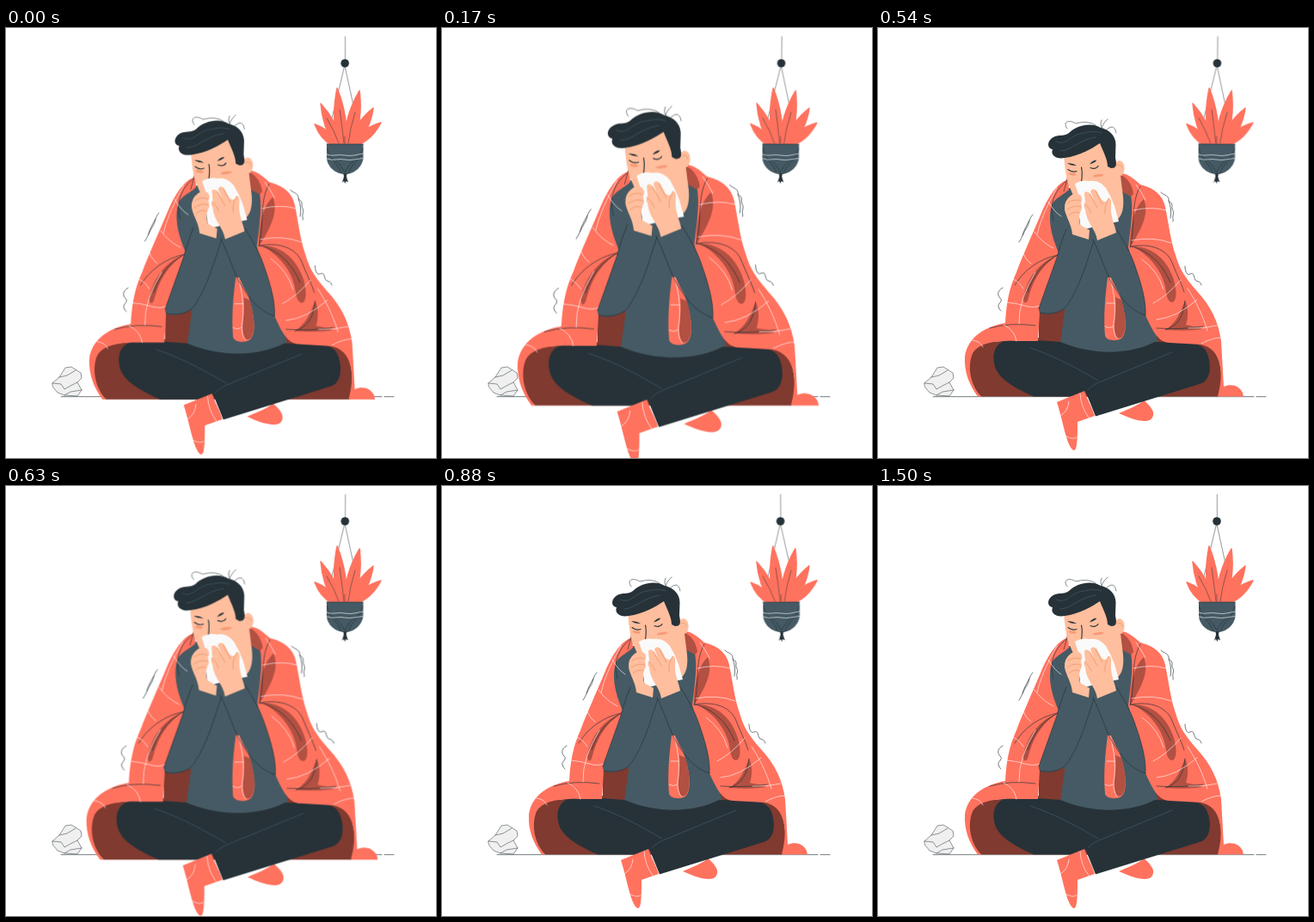
Recreate the animation shown at these times as an HTML page. Size 500 by 500 pixels, loop 1.54 s.

```html
<!DOCTYPE html>
<html lang="en">
<head>
<meta charset="utf-8">
<title>Shivering with a cold</title>
<style>
  html, body { margin: 0; width: 100%; height: 100%; overflow: hidden; background: #fff; }
  svg { display: block; width: 100vw; height: 100vh; }
  path { fill: none; stroke-linecap: round; stroke-linejoin: round; }
  .coral { fill: #ff725e; }
  .fold { fill: #b25042; }
  .deep { fill: #803a2f; }
  .dark { fill: #263238; }
  .cloth { fill: #455a64; }
  .skin { fill: #ffbe9d; }
  .blush { fill: #f79a78; }
  .paper { fill: #f0f0f0; stroke: #263238; stroke-width: .5; }
  .tissue { fill: #fafafa; }
  .ink { stroke: #263238; stroke-width: .65; }
  .soft { stroke: #455a64; stroke-width: .7; }
  .chalk { stroke: #fff; stroke-opacity: .75; stroke-width: .8; }
  .crease { stroke: #eb996e; stroke-width: .8; }
  #man { transform-origin: 263px 297px; }
  #plant { transform-origin: 397px 95px; }
</style>
</head>
<body>
<svg viewBox="0 0 500 500">
  <path class="ink" d="M64 428.700H437M440 428.700H451"/>
  <g id="crumple">
    <path class="paper" d="M54 413L62 406L69 395L76 394L87 401L88 407L83 412L88 421L83 428L68 427L60 424L55 418Z"/>
    <path class="ink" style="stroke-width:.5" d="M62 406L71 404L81 398M54 413L64 414L68 420L75 416L83 412M68 427L75 423L88 421"/>
  </g>

  <g id="plant">
    <path class="ink" style="stroke-width:.5" d="M394.300 10V37M393.600 44L379 105L374 136M393.900 44L414 136"/>
    <circle class="dark" cx="394" cy="41" r="4.800"/>
    <g id="leaves" class="coral"></g>
    <path class="ink" style="stroke-width:.5" d="M388 95Q391 115 393 134M406 98Q400 117 398 134M373 105Q382 120 387 134M394 126V134"/>
    <path class="cloth" d="M373 135H415.500V151C415 160 406 170 394.500 170C383 170 373.500 161 373 151Z"/>
    <path class="ink" d="M373 135H415.500M373.500 140C378 155 385 156 390 169M415 140C411 155 403 156 398 169M383 153Q389 158 394 168Q399 158 406 153"/>
    <path class="chalk" d="M373 147Q378 149 383 148T394 148T405 148T415 146M373.500 152Q379 154 384 153T394 153T405 153T415 151.500"/>
    <path class="dark" d="M392.500 169H396.500L396 173L398 179.500L395.500 178L394.500 181L393 178L391 180L393 173Z"/>
  </g>

  <g id="man">
    <path class="ink" d="M180 217C175 222 176 228 173 232C169 238 168 243 164 249M176 224Q170 234 168 241M145 302C138 306 139 311 142 314C146 318 139 320 140 324Q141 328 143 329"/>
    <path class="ink" d="M329 191C333 195 337 194 338 199C338 204 342 201 342 207C341 212 345 212 343 218C342 222 344 222 343 225M338 201Q342 211 340 221M357 277C357 283 359 288 363 286C368 284 367 290 369 293C372 296 374 293 376 299"/>

    <path class="deep" d="M120 428.500C103 414 98 378 122 366L187 360L187 325H222L300 320L320 355L380 362C399 376 403 405 396 428.500Z"/>
    <path class="cloth" d="M220 186C200 194 194 207 198 224L206 268L217 330L212 366C235 382 291 381 325 365L318 330L300 265L297 186Z"/>

    <path class="coral" d="M280 448C289 444 303 439 309 433C313 436 319 442 320 447C321 453 317 457 311 457C300 457 289 452 280 448Z"/>
    <path class="dark" d="M185 363H153C139 364 134 374 134.500 385C135 404 151 415 181 428.500H240L241 422L253 451.500L374 414C386 411 388 395 384 382C381 370 373 367 358 366L322 365C295 379 252 382 212 365Z"/>
    <path class="soft" d="M177 372C207 382 230 395 256 410M244 421Q250 414 262 410L342 377"/>
    <path class="coral" d="M208 435L240 422C243 432 249 441 252 451L232 458C232 471 232 483 230 489Q228 493 225 489C218 479 215 457 208 435Z"/>
    <path class="chalk" d="M235 425Q236 441 245 453M212 451Q221 446 222 434M219 475Q227 479 231 476"/>

    <path class="coral" d="M221 167L219 177C206 182 196 201 190 215C180 239 168 265 161 284C152 303 149 323 148 343C124 347 104 360 101 382C100 400 106 415 116 428.500H120C108 416 104 396 109 381C114 367 135 363 160 364H186L188 331L211 263C200 239 197 218 203 204C207 197 216 194 222 188Z"/>
    <path class="coral" d="M283 169C292 170 298 176 305 182C321 186 331 194 334 208C338 227 340 247 346 264C351 282 358 291 370 305C388 324 396 343 399 364L402 417C411 413 420 416 424 424L425 428.500H395C402 404 401 373 375 368L339 366C326 365 320 354 311 334L291 255C294 230 297 211 294 194Z"/>
    <path class="fold" d="M281 170C291 174 296 184 297 193L294 196L283 190Z"/>
    <path class="fold" d="M309 199C315 214 309 230 293 255C293 235 296 211 309 199Z"/>
    <path class="fold" d="M296 254C321 254 336 271 343 290C347 301 348 314 344 318C340 321 336 316 335 307C333 288 320 266 296 254Z"/>
    <path class="fold" d="M334 351C347 343 352 330 357 317C361 324 361 337 358 345C365 347 374 347 377 350C367 352 350 352 334 351Z"/>
    <path class="fold" d="M209 264C190 277 181 291 174 317Q170 323 169 315C172 292 188 272 209 264Z"/>
    <path class="ink" d="M209 264C188 268 169 282 159 299M209 264C191 273 181 288 174 307M294 254C316 259 331 275 340 296M294 254C317 250 336 257 342 273C349 290 354 300 356 307M357 317C355 336 349 346 334 351M324 349Q353 351 378 347M130 349Q154 342 183 346M222 169L216 190M219 178C204 190 199 206 204 224M305 184C293 205 300 230 293 255"/>
    <path class="chalk" d="M198 202Q205 214 213 219M182 237Q190 249 204 256M169 262Q172 270 178 274M157 292Q164 295 169 303M150 319Q161 320 171 323T188 323M146 345Q159 351 161 364M110 363Q119 364 122 371M208 186Q190 217 185 240M183 284Q163 316 164 344"/>
    <path class="chalk" d="M300 182Q306 190 311 200M297 212Q318 207 335 212M295 247Q320 242 341 250M307 269Q326 283 332 304M320 320Q337 311 352 293M324 339Q347 337 371 316M361 349Q378 350 394 346M376 367Q389 360 399 360M360 303C370 318 378 335 383 352"/>
    <path class="coral" d="M267 290C264 312 262 337 264 358C266 364 279 365 284 360C289 353 289 342 285 324L275 290Z"/>
    <path class="fold" d="M276 313C278 332 272 347 277 359Q280 362 284 359C290 350 288 335 283 316Z"/>
    <path class="chalk" d="M270 291C275 308 277 329 274 343Q273 355 278 361M266 320H275M264 347Q269 350 273 347"/>

    <path class="cloth" d="M219 234C213 249 210 259 208 267L187 326Q186 333 196 333C208 332 216 329 221 321C236 298 243 271 251 247Z"/>
    <path class="ink" d="M219 234C213 249 210 259 208 267L187 326M188 331C201 334 215 331 221 321C236 298 243 271 251 247"/>
    <path class="cloth" d="M250 246L278 235C287 251 294 261 300 280C307 300 312 319 311 334C296 329 284 316 276 301Z"/>
    <path class="ink" d="M250 246C261 268 266 290 276 303C286 320 298 330 311 334M278 235C287 251 294 261 300 280C307 300 312 319 311 334"/>

    <path class="skin" d="M216 147C217 161 219 176 222 183L231 204L263 209L277 224C285 218 286 207 285 196L282 172C289 169 288 154 280 154L274 158L262 130Z"/>
    <path class="crease" d="M278 160Q283 157 284 163"/>
    <ellipse class="blush" cx="226" cy="170" rx="4.500" ry="1.600" transform="rotate(8 226 170)"/>
    <ellipse class="blush" cx="256" cy="171.500" rx="6.500" ry="1.600" transform="rotate(-8 256 171)"/>
    <path class="ink" d="M221 164.500Q226 168.500 231 166.500M247 162.500Q253 165 256 160.500M236.500 162Q238 168 236.500 179" style="stroke-width:1.100"/>
    <path class="dark" d="M220 157.500Q226 156.500 231 160Q226 160.500 220 157.500ZM246 158.500Q249 154 254 153.500Q254 156 246 158.500Z"/>
    <path class="dark" d="M217 151C208 153 200 148 203 141C196 140 196 130 206 126C212 124 217 126 222 122C231 113 248 109 259 116C268 118 276 124 276.500 135L276 151C278 160 277 163 271 163L267 161C267 153 262 144 258 134C249 140 234 149 217 151Z"/>
    <path class="ink" style="stroke-width:.55" d="M220 117C214 109 222 106 230 111Q244 107 253 113M259 118Q262 110 267 106M262 118Q257 113 260 107M266 118Q275 110 277 122"/>
    <path class="soft" d="M207 132C220 138 224 123 240 122Q252 119 260 122M212 143C224 143 233 130 253 127"/>

    <path class="tissue" d="M229 181Q237 176 246 178Q257 176 265 186Q271 196 275 207L280 225L260 229L236 235L233 212L234 197Z"/>
    <path class="skin" d="M224 195Q230 190 235 194Q239 198 236 203L237 210Q232 219 235 229L246 235L245 246L226 240C225 228 219 221 217 211Q216 201 224 195Z"/>
    <path class="crease" d="M221 203Q228 198 235 201M220 211Q229 205 236 208M222 218Q228 212 234 215"/>
    <path class="skin" d="M240 192Q242 188 247 193L251 200L247 190Q249 185 254 189L260 200Q265 205 268 198Q272 197 271 207C270 220 276 230 277 238L255 247C253 233 242 226 241 211Q238 206 241 204Z"/>
    <path class="crease" d="M240 204Q246 209 248 215M246 193L255 209M253 190L261 205M268 198Q263 207 264 216"/>
  </g>
</svg>
<script>
  // Each leaf: base x, tip x, tip y, half width
  const leaves = [
    [384, 359, 112, 8], [387, 366, 88, 9], [404, 436, 110, 9],
    [402, 427, 93, 10], [398, 411, 73, 11], [391, 385, 70, 10]
  ];
  const soil = 136;

  function leafPath([bx, x, y, w]) {
    const dx = x - bx, dy = y - soil, len = Math.hypot(dx, dy);
    const nx = -dy / len * w, ny = dx / len * w;
    const mx = bx + dx * .5, my = soil + dy * .5;
    const side = s => `${mx + s * nx} ${my + s * ny}`;
    return `M${bx - 5} ${soil}Q${side(-1)} ${x} ${y}Q${side(1)} ${bx + 5} ${soil}Z`;
  }

  const NS = 'http://www.w3.org/2000/svg';
  for (const leaf of leaves) {
    const p = document.createElementNS(NS, 'path');
    p.setAttribute('d', leafPath(leaf));
    p.setAttribute('class', 'coral');
    // Slightly rounded tips
    p.setAttribute('style', 'stroke:#ff725e;stroke-width:1.5');
    document.getElementById('leaves').append(p);
  }

  const LOOP = 1540, LEAD = 37;

  function play(id, steps) {
    const frames = steps.map(([ms, transform]) => ({ offset: ms / LOOP, transform }));
    document.getElementById(id).animate(frames, { duration: LOOP, delay: -LEAD, iterations: Infinity });
  }

  const rest = 'scale(1)', beat = 'scale(1.1)';
  play('man', [[0, rest], [150, beat], [450, rest], [600, rest], [750, beat], [900, rest], [LOOP, rest]]);

  const turn = deg => `rotate(${deg}deg)`;
  play('plant', [[0, turn(0)], [375, turn(1)], [1125, turn(-1)], [1500, turn(0)], [LOOP, turn(0)]]);
</script>
</body>
</html>
```
